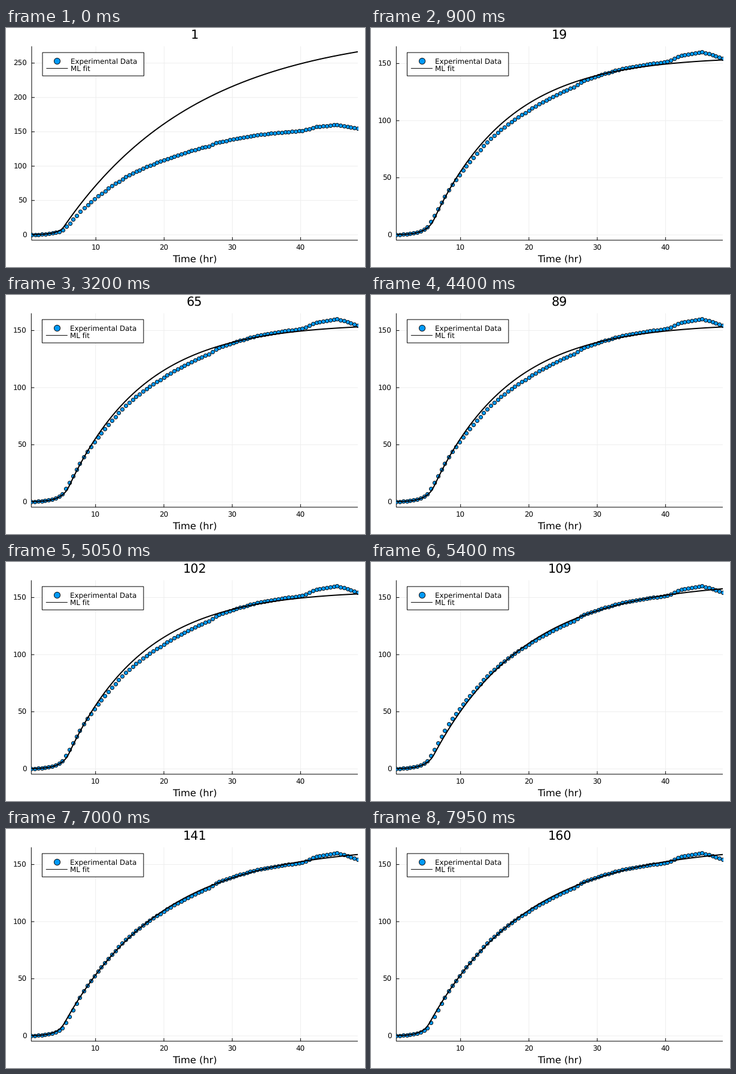
Animation, 600 px wide and 400 px high, one loop 8000 ms. Source, as a matplotlib script:

```python
import numpy as np
import matplotlib.pyplot as plt
from matplotlib.animation import FuncAnimation
from matplotlib.patches import Rectangle

plt.rcParams["font.family"] = "DejaVu Sans"
plt.rcParams["text.hinting"] = "none"

FRAMES, INTERVAL = 160, 50
PT = 0.72  # points per pixel at 100 dpi
RIGHT, TOP, BOTTOM = 588, 30.6, 355.1
T_MIN, T_MAX = 0.593, 48.38
BLUE = "#009AFA"

# Fit parameters: plateau, rate, end of lag, value at end of lag
START = np.array([300, 0.05, 5.1, 8.7])
ROUGH = np.array([156.4, 0.0895, 5.9, 10.9])
BETTER = np.array([164.3, 0.074, 5.9, 10.2])
FINAL = np.array([166.7, 0.0692, 5.2, 8.7])
STAGES = [(0, 12, START, ROUGH), (102, 108, ROUGH, BETTER), (108, 114, BETTER, FINAL)]


def growth(t, plateau, rate, lag, base):
    """Exponential rise during the lag, then saturation."""
    speed = np.log(base / 0.2) / (lag - T_MIN)
    early = base * np.exp(speed * np.minimum(t - lag, 0))
    late = plateau - (plateau - base) * np.exp(-rate * np.maximum(t - lag, 0))
    return np.where(t < lag, early, late)


def params(k):
    for begin, end, a, b in reversed(STAGES):
        if k >= begin:
            u = min((k - begin) / (end - begin), 1)
            return a + (b - a) * (1 - (1 - u) ** 3)


def fit(k):
    p = params(k)
    return np.mean([growth(grid_t + d, *p) for d in np.linspace(-0.25, 0.25, 7)], axis=0)


# Measurements: about two per hour with one longer gap, drifting around the best fit
index = np.arange(95)
times = T_MIN + 0.5073 * index + 0.106 * (index > 14)
drift_t, drift = zip((4, 0), (6.1, -2.3), (7.7, 0), (14.9, 1.1), (20, -1), (26.6, -1.4),
                     (27.6, 0.6), (33.7, 0.8), (40.3, -1.2), (42.3, 2.6), (45.3, 3.5),
                     (48.4, -4.2))
values = growth(times, *FINAL) + np.interp(times, drift_t, drift)
grid_t = np.linspace(T_MIN, T_MAX, 500)

fig = plt.figure(figsize=(6, 4), dpi=100, facecolor="white")
ax = fig.add_axes([0, 0, 1, 1])
ax.set_xlim(0, 600)
ax.set_ylim(400, 0)
ax.axis("off")


def line(width=1.0, color="black", z=2, **kw):
    return ax.plot([], [], color=color, lw=width * PT, zorder=z, snap=False,
                   solid_capstyle="butt", **kw)[0]


def label(s, size, ha, z=2):
    return ax.text(0, 0, s, fontsize=size * PT, ha=ha, va="baseline", zorder=z)


def dots(size, z):
    return ax.plot([], [], "o", ms=size * PT, mfc=BLUE, mec="black",
                   mew=0.9 * PT, zorder=z, snap=False)[0]


def ticks(numbers, ha):
    return [(v, line(color="#eeeeee", z=1), line(), label(str(v), 11.85, ha))
            for v in numbers]


clip = ax.add_patch(Rectangle((42, TOP), RIGHT - 42, BOTTOM - TOP + 1,
                              fc="none", ec="none"))
title = label("", 20.8, "center")
xlabel = label("Time (hr)", 16.3, "center")
xticks = ticks(range(10, 50, 10), "center")
yticks = ticks(range(0, 300, 50), "right")
spine = line(solid_joinstyle="miter")
points = dots(6.2, 3)
curve = line(2, z=4)
points.set_clip_path(clip)
curve.set_clip_path(clip)

box = ax.add_patch(Rectangle((0, 41.1), 169.5, 39, fc="white", ec="black",
                             lw=PT, zorder=5, snap=False))
key_dot = dots(10.2, 6)
key_line = line(z=6)
key_data = label("Experimental Data", 11.85, "left", 6)
key_fit = label("ML fit", 11.85, "left", 6)


def draw(k):
    model = fit(k)
    low = min(values.min(), model.min())
    high = max(values.max(), model.max())
    pad = 0.03 * (high - low)
    low, high = low - pad, high + pad
    left = 42.9 if high >= 200 else 42.3  # wider labels push the axis right
    center = (left + RIGHT) / 2

    def px(t):
        return left + (t - T_MIN) / (T_MAX - T_MIN) * (RIGHT - left)

    def py(v):
        return BOTTOM - (v - low) / (high - low) * (BOTTOM - TOP)

    title.set_text(str(k + 1))
    title.set_position((center, 18.2))
    xlabel.set_position((center + 0.2, 391.6))
    spine.set_data([left, left, RIGHT], [TOP, BOTTOM, BOTTOM])

    for v, rule, tick, text in xticks:
        x = px(v)
        rule.set_data([x, x], [TOP, BOTTOM])
        tick.set_data([x, x], [BOTTOM, BOTTOM - 5])
        text.set_position((x - 0.4, 371.4))
    for v, rule, tick, text in yticks:
        y = py(v)
        rule.set_data([left, RIGHT], [y, y])
        tick.set_data([left, left + 5], [y, y])
        text.set_position((left - 7.9, y + 4.5))
        for part in (rule, tick, text):
            part.set_visible(v <= high)

    points.set_data(px(times), py(values))
    curve.set_data(px(grid_t), py(model))

    box.set_x(left + 18.1)
    key_dot.set_data([left + 42.4], [54.6])
    key_line.set_data([left + 24.5, left + 60.5], [67.6, 67.6])
    key_data.set_position((left + 64.6, 59))
    key_fit.set_position((left + 64.6, 72))
    return []


anim = FuncAnimation(fig, draw, frames=FRAMES, interval=INTERVAL,
                     init_func=lambda: draw(0), repeat=True, repeat_delay=0)
plt.show()
```
